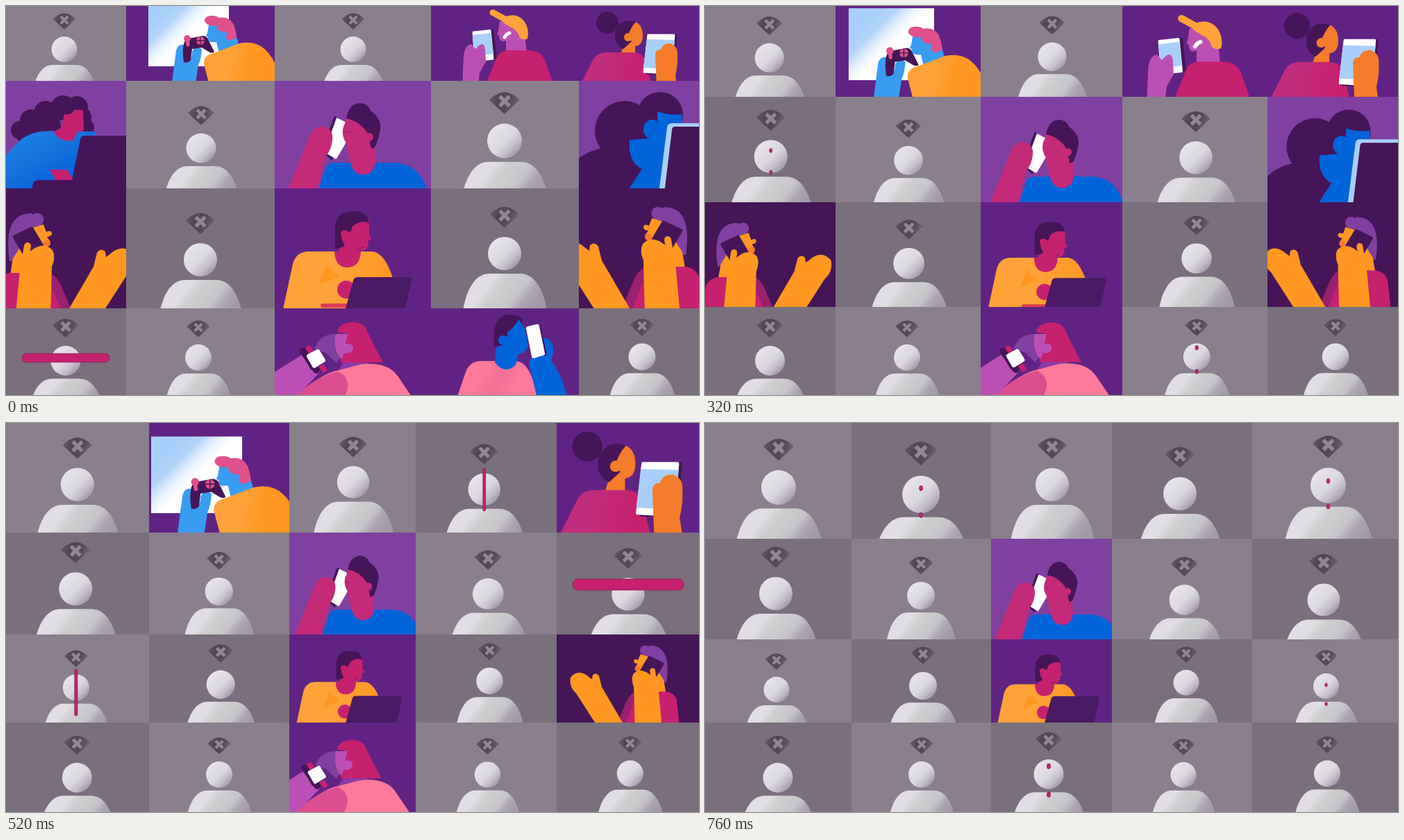
An HTML page with a canvas for the animation above (0.8 s loop, 998 by 561 pixels).

```html
<!DOCTYPE html>
<html>
<head>
<meta charset="utf-8">
<style>
  html, body { margin: 0; width: 100%; height: 100%; overflow: hidden; background: #612383; }
  canvas { display: block; }
</style>
</head>
<body>
<canvas id="stage" width="998" height="561"></canvas>
<script>
const ctx = document.getElementById('stage').getContext('2d');
const LOOP = 800, STEP = 40;
const LIGHT = '#8a7f8c', DARK = '#7a6f7c';
const INK = '#451558', PURPLE = '#612383', VIOLET = '#8040a0', PINK = '#c7206f', BLUE = '#0064db',
  SKY = '#389cf0', ICE = '#a8cffa', ORANGE = '#ff9720', AMBER = '#ffa238', RUST = '#f57c2a',
  ORCHID = '#bb50b4', SALMON = '#ff7a9a', ROSE = '#e0508c', WHITE = '#fff';

function blend(x1, y1, x2, y2, ...colors) {
  const g = ctx.createLinearGradient(x1, y1, x2, y2);
  colors.forEach((c, i) => g.addColorStop(i / (colors.length - 1), c));
  return g;
}
// A shape is a filled path; a width adds a round stroke in the same colour.
const shape = (color, d, width = 0) => ({ color, path: new Path2D(d), width });
const disc = (color, x, y, r) =>
  shape(color, `M${x - r} ${y}a${r} ${r} 0 1 0 ${2 * r} 0a${r} ${r} 0 1 0 ${-2 * r} 0Z`);

function paint({ color, path, width }) {
  ctx.fillStyle = ctx.strokeStyle = color;
  ctx.fill(path);
  if (width) {
    ctx.lineWidth = width;
    ctx.stroke(path);
  }
}

const avatar = [
  shape(blend(-.9, -2.6, .8, -1.9, '#655a67', '#52455390', '#55495a', '#726875'),
    'M-.88-2.36Q0-3.27.87-2.36L.03-1.57H-.03Z'),
  shape(blend(-.5, 1.3, 2.2, 3.4, '#e0dee2', '#cfced1', '#cbcacc', '#c6c4c9', '#aca5b2', '#a39baa', '#9f97a6'),
    'M-2.45 3.15C-2.2 2-1.7 1.21-.92 1.21H.95C1.72 1.21 2.25 2 2.5 3.15L2.6 4.5H-2.55Z'),
  disc(blend(-.7, -.7, .75, .75, '#e6e4e8', '#e0dee3', '#dbd8de', '#c3beca', '#9d95a4'), 0, 0, 1)
];
avatar[0].color = blend(-.9, -2.6, .8, -1.9, '#655a67', '#524553', '#55495a', '#726875');
const cross = new Path2D('M-.28-2.57L.28-2.01M.28-2.57L-.28-2.01');

const gamer = [
  shape(blend(238, 0, 270, 32, ICE, '#b2d4fa', '#e4f0fd', WHITE), 'M205-11H321V87H205Z'),
  shape(SKY, 'M292 27L290 39 288 43 291 45Q291 53 298 52L303 52 307 68 336 58 328 30Z'),
  shape(ROSE, 'M286 22Q286 14 296 14Q304 14 306 17Q322 14 328 27Q332 38 332 46L322 50Q315 46 314 38Q304 36 303 28Q290 30 286 22Z'),
  disc(SKY, 314, 41, 4),
  shape(blend(290, 80, 350, 90, AMBER, AMBER, ORANGE),
    'M285 84Q284 74 293 70L336 54Q354 50 367 58Q379 66 387 82V118H294Z'),
  shape(SKY, 'M238 118L245 64Q248 54 256 56L258 80Q268 80 268 66Q272 56 282 62Q281 78 277 85L272 118Z'),
  shape(INK, 'M256 81Q252 50 262 47L284 43Q291 44 292 50L300 66Q297 69 292 66L282 60 268 62 266 78Q262 83 256 81Z'),
  disc(ROSE, 280, 50, 6),
  shape(INK, 'M280 44V56M274 50H286', 1.3),
  shape(ROSE, 'M261 48L262 56', 5),
  disc(ROSE, 261, 47, 5)
];
const capFan = [
  shape(INK, 'M676 38L701 35 705 75 681 78Z', 3),
  shape(WHITE, 'M673 38L697 35.500 701 76 676 79Z', 3),
  shape(ICE, 'M672 42L698 39 702 69 675 72Z'),
  shape(ORCHID, 'M657 118L659 72Q661 56 670 55L676 62Q688 48 690 62L691 80 682 96 680 118Z'),
  shape(ORCHID, 'M711 22L709 36 707 41 710 42Q710 51 716 51L720 50V68H750L747 40 740 20Z'),
  shape(PINK, 'M689 118L706 76Q711 64 724 64H752Q770 64 776 78L790 118Z'),
  shape(AMBER, 'M701 9.500L724 22', 9),
  shape(AMBER, 'M717 16Q736 8 747 23Q754 34 751 47Q746 50 740 46Q737 35 726 30L716 24Z'),
  shape(WHITE, 'M718 45L721 41 725 39', 5)
];
const bunHead = [
  disc(INK, 866, 24, 16),
  shape(RUST, 'M907 23Q917 28 917 42Q917 57 906 58V74H884L889 58Q890 38 907 23Z'),
  shape(INK, 'M907 23Q886 16 878 36Q874 55 889 62L901 51 896 43Q899 32 907 23Z'),
  disc(RUST, 896, 45, 6)
];
const bunBody = [
  shape(blend(860, 90, 915, 96, '#c22c7c', PINK), 'M825 118L844 80Q850 67 865 67H902Q918 67 921 80L931 118Z')
];
const bunPhone = [
  shape(INK, 'M928 42H965L961 97H923Z', 3),
  shape(WHITE, 'M925 42H962L957 97 919 95Z', 3),
  shape(ICE, 'M923 48L963 49 958 91 918 89Z'),
  shape(RUST, 'M937 118L935 70Q936 62 943 63Q946 53 957 54Q968 58 967 70V82Q966 92 964 100L967 118Z')
];
const curly = [
  ...[[20, 179, 13], [36, 165, 16], [57, 154, 17], [82, 147, 18], [102, 146, 16], [108, 160, 15],
    [115, 175, 12], [55, 174, 24], [30, 184, 16]].map(d => disc(INK, ...d)),
  shape(PINK, 'M84 156Q94 158 98 150H111L112 178Q110 184 100 182L96 200H68L66 182 80 176Z'),
  shape(blend(20, 190, 60, 264, '#1a80e4', '#1670dc', BLUE),
    'M-2 217L18 196Q30 184 50 181L68 180Q76 197 96 194L104 181H130V264H-2Z'),
  shape(PINK, 'M63 236H88L98 252H72Z'),
  shape(INK, 'M107 192Q108 187 113 187H180V266H38V262Q38 251 48 251H95Z')
];
const caller = [
  shape(BLUE, 'M448 272L460 235Q463 226 474 226H560Q590 228 602 254L608 272Z'),
  shape('#c42a78', 'M491 160L486 174Q478 186 489 194L496 226Q500 243 514 243Q530 243 532 225L530 170Z'),
  shape(INK, 'M490 162Q494 140 511 140Q521 141 525 151Q541 162 539 178Q536 194 531 204L526 206 521 184Q510 166 490 162Z'),
  disc('#c42a78', 523, 189, 6),
  shape(INK, 'M474 161L457 208 469 220', 4),
  shape(WHITE, 'M477 163L487 168Q479 183 488 197L475 219 460 210Z', 3),
  shape('#c42a78', 'M403 272L437 188Q444 172 458 174Q472 178 470 194Q468 208 461 216L455 236 446 272Z'),
  shape('#a01c64', 'M487 181L494 183', 1)
];
const bigHair = [
  disc(INK, 891, 180, 43),
  disc(INK, 942, 157, 33),
  shape(INK, 'M780 280Q815 204 872 204H940V300Z'),
  shape(BLUE, 'M938 152Q955 158 974 156L973 172H955L942 270H893L916 235Q895 225 898 193L925 191Q914 182 920 170Q928 160 938 166Z'),
  shape(ICE, 'M940 270L952 175Q953 169 959 169H1050V270Z'),
  shape(INK, 'M948 270L959 179Q959 174 964 174H1050V270Z')
];
const shouter = [
  shape(VIOLET, 'M5 368Q-5 299 36 299L50 306V318L36 324 24 368Z'),
  disc(VIOLET, 45, 308, 9.5),
  shape(ORANGE, 'M38 320L54 315 58 326Q66 322 66 329Q65 332 59 333L64 340Q62 350 52 350L22 387H6L10 364Z'),
  disc(RUST, 59, 342, 5),
  shape(PINK, 'M-20 455L-14 400Q-8 386 6 385H62Q72 388 78 402L101 455Z'),
  shape('#9a2070', 'M62 386Q74 390 80 404L101 455H86L62 396Z'),
  shape(INK, 'M12 333L37 321 52 346 27 358Z', 5),
  shape(ORANGE, 'M31 346L27 370', 10),
  shape(ORANGE, 'M13 455L20 380Q24 360 40 350Q56 340 67 352Q72 362 66 376L64 455Z'),
  shape(ORANGE, 'M80 455L126 376 131 356Q136 348 143 354L144 362 156 353Q172 344 184 358Q188 376 174 388L131 455Z')
];
const typist = [
  shape(blend(410, 370, 550, 400, AMBER, AMBER, ORANGE), 'M398 442L413 372Q418 354 436 354H528Q545 356 557 392V442Z'),
  shape(ORANGE, 'M462 373L450 402 480 390Z'),
  shape(PINK, 'M473 354H511Q510 377 491 377Q474 377 473 354Z'),
  shape(PINK, 'M486 308H523V330L527 336 522 338Q523 355 508 353V366H478Z'),
  shape(INK, 'M474 349V318Q476 295 503 296Q520 297 523 313Q510 308 499 318L496 326Q482 322 484 338L488 345Q484 350 474 349Z'),
  disc(PINK, 488, 329, 6),
  shape('#9a2070', 'M504 352L514 348', 2),
  disc(PINK, 490, 409, 13),
  shape('#dd3a56', 'M456 432H496', 6)
];
const laptop = [shape('#4a1a62', 'M500 396Q501 391 507 391H580Q585 391 584 396L573 444H487Z')];
const watchWearer = [
  shape(VIOLET, 'M444 494Q452 474 472 473Q488 480 484 500L476 515 460 500Z'),
  shape(ORCHID, 'M474 473H493L502 493 488 514Q476 506 474 490Z'),
  shape('#8a3aa8', 'M488 510H522V526H478Z'),
  shape(PINK, 'M477 470Q480 456 500 456Q512 456 518 464Q525 480 543 514H481L487 501Q500 502 500 493Q499 486 489 487L492 473Z'),
  shape(ORCHID, 'M374 536L428 502 452 528 410 572H374Z'),
  shape(SALMON, 'M410 572Q450 530 480 525L510 517Q550 512 565 535L590 572Z'),
  shape('#dd4e90', 'M408 572Q440 536 478 527Q495 535 492 553L484 572Z'),
  shape(INK, 'M428 498L447 525', 10),
  shape(PINK, 'M436 494L458 524', 8),
  shape(INK, 'M433 507L447 498 456 513 441 522Z', 6),
  shape(WHITE, 'M436 505L449 498 457 511 444 519Z', 6)
];
const blueCaller = [
  shape(blend(690, 520, 735, 545, SALMON, '#f27096', SALMON), 'M649 566L662 528Q668 512 684 512H735Q756 514 766 566Z'),
  shape(INK, 'M703 492Q698 446 725 445Q742 445 744 454L728 486Z'),
  shape(BLUE, 'M738 452L748 466 752 490Q748 502 738 502L734 518Q718 532 704 514L706 492Q724 488 722 470Q732 464 738 452Z'),
  disc(BLUE, 716, 482, 7),
  shape(BLUE, 'M772 478Q790 480 788 500L785 512Q800 530 809 566H765L753 515 760 500Z'),
  shape(INK, 'M768 463L776 502', 5),
  shape(WHITE, 'M752 465L765 462 773 501 760 505Z', 6)
];

const tiles = [];
// from/to: head x, y and radius. off: start time, bar width and bar offset from the head.
const tile = (col, row, tone, from, to, off, scene) => tiles.push({ col, row, tone, from, to, off, scene });
const layer = (shapes, grow, dx, dy, flip) => ({ shapes, grow, dx, dy, flip });
const scene = (back, ...layers) => ({ back, layers });

tile(0, 0, LIGHT, [84, 62.5, 18.5], [106, 93, 25]);
tile(1, 0, DARK, [286, 50, 21], [311, 103, 27], [600, 159, 0, .5], scene(PURPLE, layer(gamer, .151, -26.3, 37)));
tile(2, 0, LIGHT, [500, 62.5, 18.5], [500, 89, 24]);
tile(3, 0, DARK, [718, 57, 18.5], [684, 102, 24], [440, 128, -1, -4.5], scene(PURPLE, layer(capFan, .354, -285, 18)));
tile(4, 0, LIGHT, [905, 60, 22], [897.5, 90, 25.5], [600, 151, 1, 2],
  scene(PURPLE, layer(bunHead, .414, -392, 1.6), layer(bunBody, .256, -242, 17.4), layer(bunPhone, .414, -392, 1.6)));

tile(0, 1, DARK, [90, 198, 24], [102, 246, 24], [160, 129, -3, -3], scene(VIOLET, layer(curly, 0, 0, 0)));
tile(1, 1, LIGHT, [281, 205, 21.5], [311, 249, 20]);
tile(2, 1, LIGHT, [500, 200, 22], [500, 250, 22], null, scene(VIOLET, layer(caller, -.115, 59, 76)));
tile(3, 1, LIGHT, [718, 194.5, 25], [690.5, 255, 22]);
tile(4, 1, DARK, [927, 198, 25], [891, 255, 23.5], [520, 160, 0, -14], scene(VIOLET, layer(bigHair, -.116, 72, 78)));

tile(0, 2, LIGHT, [88, 363.5, 23], [103, 384.5, 18.5], [440, 140, 2, 2], scene(INK, layer(shouter, -.22, 34, 100)));
tile(1, 2, DARK, [280, 366, 24], [314, 379, 20]);
tile(2, 2, DARK, [500, 366, 24], [500, 379, 20], null,
  scene(PURPLE, layer(typist, -.26, 125, 114.7), layer(laptop, -.17, 83.3, 69.5)));
tile(3, 2, DARK, [718, 357, 24], [693, 374.5, 18.5]);
tile(4, 2, LIGHT, [910, 360, 19], [894.5, 379.5, 18.5], [600, 112, 0, 2], scene(INK, layer(shouter, -.267, 229, 113.6, true)));

tile(0, 3, DARK, [86, 511.5, 21.5], [105, 511.5, 21.5], [0, 126, 0, -4]);
tile(1, 3, LIGHT, [277, 507, 19], [312, 507, 19]);
tile(2, 3, DARK, [495, 506, 21], [495, 506.5, 21.5], [600, 168, 2, -1], scene(PURPLE, layer(watchWearer, -.046, 22, 22)));
tile(3, 3, LIGHT, [721, 505, 20], [689, 507.5, 18.5], [160, 141, -2, -6], scene(PURPLE, layer(blueCaller, 0, 0, 0)));
tile(4, 3, DARK, [916, 506, 19.5], [896, 505.5, 19]);

// Smooth curve through the time/progress keys of the grid move.
const keys = [[0, 0], [140, 0], [320, .4], [440, .735], [520, .86], [600, .925], [760, 1]];
function progress(t) {
  const i = keys.findIndex(k => k[0] > t) - 1;
  if (i < 0) return 1;
  const slope = j => {
    const a = keys[Math.max(0, j - 1)], b = keys[Math.min(keys.length - 1, j + 1)];
    return (b[1] - a[1]) / (b[0] - a[0]);
  };
  const [t0, p0] = keys[i], [t1, p1] = keys[i + 1];
  const d = t1 - t0, u = (t - t0) / d, v = 1 - u;
  return Math.max(0, p0 + (p1 - p0) * u * u * (3 - 2 * u) + d * u * v * (v * slope(i) - u * slope(i + 1)));
}

function pill(x, y, w, h) {
  ctx.beginPath();
  ctx.roundRect(x - w / 2, y - h / 2, w, h, Math.min(w, h) / 2);
  ctx.fillStyle = PINK;
  ctx.fill();
  ctx.strokeStyle = '#8c1a55';
  ctx.lineWidth = .8;
  ctx.stroke();
}

// Switch-off flash: wide bar, short bar, upright line, split line, two dots.
function drawFlash(age, size, x, y) {
  const phase = Math.floor(age / STEP);
  if (phase < 3) {
    const [w, h] = [[1, .1], [.4, .11], [.029, .48]][phase];
    pill(x, y, w * size, h * size);
  } else if (phase < 5) {
    const [gap, h] = phase === 3 ? [.16, .12] : [.122, .045];
    for (const side of [-1, 1]) pill(x, y + side * gap * size, .029 * size, h * size);
  }
}

function drawAvatar(x, y, r) {
  ctx.save();
  ctx.translate(x, y);
  ctx.scale(r, r);
  avatar.forEach(paint);
  ctx.strokeStyle = '#918693';
  ctx.lineWidth = .22;
  ctx.lineCap = 'butt';
  ctx.stroke(cross);
  ctx.restore();
}

function drawLayer({ shapes, grow, dx, dy, flip }, p) {
  const s = 1 + grow * p;
  ctx.save();
  ctx.translate(dx * p, dy * p);
  ctx.scale(s, s);
  if (flip) ctx.transform(-1, 0, 0, 1, 984, -9);
  ctx.lineCap = ctx.lineJoin = 'round';
  shapes.forEach(paint);
  ctx.restore();
}

function draw(t) {
  const p = progress(t);
  const xs = [0, 173.4 + 37.6 * p, 386.5 + 25.3 * p, 611.5 - 25.2 * p, 824.5 - 37 * p, 998];
  const ys = [0, 107.5 + 59 * p, 263.3 + 48.5 * p, 435.5 - 4 * p, 561];
  for (const { col, row, tone, from, to, off, scene } of tiles) {
    const left = Math.round(xs[col]), top = Math.round(ys[row]);
    const width = Math.round(xs[col + 1]) - left, height = Math.round(ys[row + 1]) - top;
    const lit = scene && (!off || t < off[0]);
    ctx.save();
    ctx.beginPath();
    ctx.rect(left, top, width, height);
    ctx.clip();
    ctx.fillStyle = lit ? scene.back : tone;
    ctx.fillRect(left, top, width, height);
    if (lit) {
      scene.layers.forEach(l => drawLayer(l, p));
    } else {
      const [x, y, r] = from.map((v, i) => v + (to[i] - v) * p);
      drawAvatar(x, y, r);
      if (off) {
        const [start, size, dx, dy] = off, age = t - start;
        drawFlash(age, size, x + (age < 80 ? dx : 0), y + dy + age / 16);
      }
    }
    ctx.restore();
  }
}

function tick() {
  draw(Math.floor(performance.now() % LOOP / STEP) * STEP);
  requestAnimationFrame(tick);
}
tick();
</script>
</body>
</html>
```
